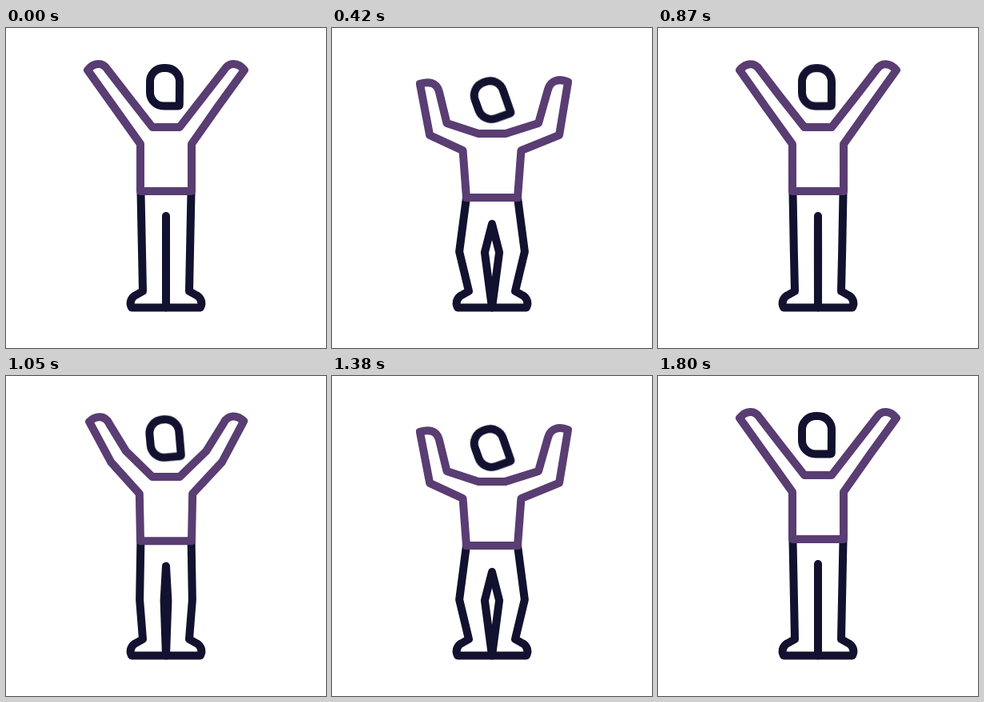
An HTML page without scripts for the animation above (1830 ms loop, 400x400 px).

```html
<!DOCTYPE html>
<html lang="en">
<head>
<meta charset="utf-8">
<title>Squatting figure</title>
<style>
  html, body { margin: 0; width: 100%; height: 100%; overflow: hidden; background: #fff; }
  svg { display: block; width: 100vw; height: 100vh; }
  path {
    fill: none;
    stroke: #12112f;
    stroke-width: 10;
    stroke-linecap: round;
    stroke-linejoin: round;
    animation: 1830ms cubic-bezier(.333, 0, .667, 1) infinite;
  }
  .legs { animation-name: legs; }
  .inseam { animation-name: inseam; }
  .shirt { stroke: #593d73; animation-name: shirt; }
  .head { transform-origin: 198.5px 73.75px; animation-name: head; }

  /* two dips of 900 ms, then a 30 ms hold */
  @keyframes legs {
    0%, 49.18%, 98.36%, 100% {
      d: path("M168.5 206 L170 280 L171 329 L163 333.5 C157 336 153.5 343 157 349.5 L243 349.5 C246.500 343 243 336 237 333.5 L229 329 L230 280 L231.5 206");
    }
    24.59%, 73.77% {
      d: path("M168 212 L159 279.5 L171 329 L163 333.5 C157 336 153.5 343 157 349.5 L243 349.5 C246.500 343 243 336 237 333.5 L229 329 L241 279.5 L232 212");
    }
  }
  @keyframes inseam {
    0%, 49.18%, 98.36%, 100% { d: path("M200 235 L200 280.5 L200 349.5 L200 280.5 Z"); }
    24.59%, 73.77% { d: path("M200 245 L190.8 280.5 L200 349.5 L209.2 280.5 Z"); }
  }
  @keyframes shirt {
    0%, 49.18%, 98.36%, 100% {
      d: path("M168 204 L168 145 L134.5 98 L102 52.5 C109.500 43 121 42 127 52 L152.5 85 L183 124 L217 124 L247.3 85 L273 52 C279 42 290.500 43 298 52.5 L265 98 L232 145 L232 204 Z");
    }
    24.59%, 73.77% {
      d: path("M168 212.2 L163.5 153.2 L122 134.4 L110 70 C121 67 131 68 134 80 L143.4 119.4 L183 132 L217 132 L258.2 119.4 L270 77 C273 65.500 284 63 295 67.5 L284.3 134.2 L236.5 153.2 L232 212.2 Z");
    }
  }
  @keyframes head {
    0%, 49.18%, 98.36%, 100% { transform: translateY(0) rotate(0deg); }
    24.59%, 73.77% { transform: translateY(16.5px) rotate(-20deg); }
  }
</style>
</head>
<body>
<svg viewBox="0 0 400 400">
  <path class="legs"/>
  <path class="inseam"/>
  <path class="shirt"/>
  <path class="head" d="M216.8 96.2 Q216.8 97.500 215.500 97.5 H197 A17 17 0 0 1 180 80.5 V67 A17 17 0 0 1 197 50 H200 A17 17 0 0 1 217 67 Z"/>
</svg>
</body>
</html>
```
